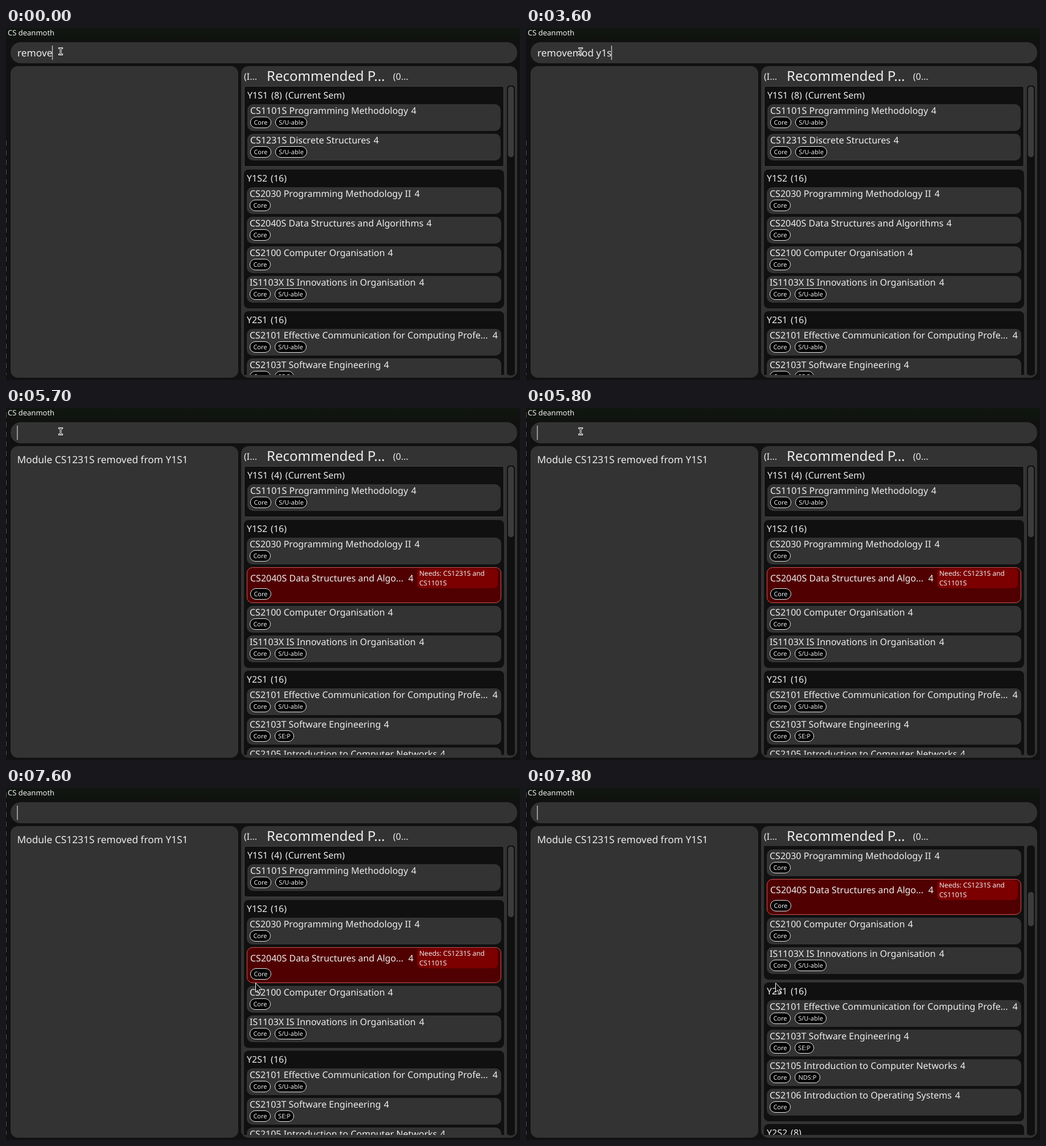
Write an HTML page that moves like this. It is 903 px wide and 619 px high and loops after 8 s.

```html
<!DOCTYPE html>
<html lang="en">
<head>
<meta charset="utf-8">
<title>Module planner</title>
<style>
html, body { margin: 0; width: 100%; height: 100%; overflow: hidden; background: #101110; }
svg { display: block; width: 100%; height: 100%; }
text { font-family: "Noto Sans", sans-serif; font-size: 16px; fill: #eee; white-space: pre; text-rendering: geometricPrecision; }
.input { font-size: 17.33px; }
.heading { font-size: 24px; }
.small { font-size: 13px; }
.tag { font-size: 11px; text-anchor: middle; }
.needs { font-size: 12px; }
.end { text-anchor: end; }
</style>
</head>
<body>
<svg viewBox="0 0 903 619">
  <defs>
    <linearGradient id="titleBar" x1="0" y1="0" x2="0" y2="1">
      <stop offset="0" stop-color="#10170f"/><stop offset="1" stop-color="#101110"/>
    </linearGradient>
    <clipPath id="viewport"><rect x="413" y="102" width="465" height="508"/></clipPath>
    <path id="beam" d="M-2.5-5.5H-1.5L0-4.5 1.5-5.5H2.5M0-4.5V4.5M-2.5 5.5H-1.5L0 4.5 1.5 5.5H2.5"/>
  </defs>
  <rect width="903" height="619" fill="#101110"/>
  <rect width="903" height="25" fill="url(#titleBar)"/>
  <path id="edge" stroke="#555" stroke-dasharray="9 8"/>
  <text class="small" x="3" y="12.5">CS deanmoth</text>
  <g fill="#333">
    <rect x="8" y="25" width="890" height="37" rx="18"/>
    <rect x="8" y="67" width="400" height="548" rx="13"/>
    <rect x="413" y="67" width="485" height="548" rx="13"/>
  </g>
  <text class="input" id="command" x="20" y="50"></text>
  <path id="caret" stroke="#ccc" stroke-width="1.3"/>
  <text class="input" id="message" x="19.5" y="97">Module CS1231S removed from Y1S1</text>
  <text x="418" y="91">(I...</text>
  <text class="heading" x="458" y="93">Recommended P...</text>
  <text x="680" y="91">(0...</text>
  <g clip-path="url(#viewport)"><g id="before"></g><g id="after"></g></g>
  <rect x="880" y="101" width="14" height="510" rx="5" fill="#101010"/>
  <rect id="thumb" x="882" width="10" rx="4.5" fill="#3c3c3c"/>
  <g id="ibeam" fill="none" stroke-linecap="square">
    <use href="#beam" stroke="#fff" stroke-width="3"/>
    <use href="#beam" stroke="#111"/>
  </g>
  <path id="arrow" d="M.5.8V17L4.2 13.5 6.7 19.3 9.3 18.2 6.8 12.5H11.6Z" fill="#111" stroke="#fff"/>
</svg>
<script>
const $ = id => document.getElementById(id);
const rect = (x, y, w, h, r, fill, stroke) =>
  `<rect x="${x}" y="${y}" width="${w}" height="${h}" rx="${r}" fill="${fill}" ${stroke ? `stroke="${stroke}"` : ""}/>`;
const text = (x, y, value, cls = "") => `<text x="${x}" y="${y}" class="${cls}">${value}</text>`;

const pillWidth = { "Core": 37, "S/U-able": 56, "SE:P": 34, "NDS:P": 45 };
function pills(x, middle, tags) {
  return tags.map(tag => {
    const w = pillWidth[tag];
    const pill = rect(x + .5, middle - 9.5, w - 1, 19, 9.5, "#000", "#e8e8e8") +
      text(x + w / 2, middle + 4, tag, "tag");
    x += w + 7;
    return pill;
  }).join("");
}

// A module is [title, right edge of its credits, extra tag, blocked]
const methodology = ["CS1101S Programming Methodology", 721, "S/U-able"];
const discrete = ["CS1231S Discrete Structures", 655, "S/U-able"];
const secondSem = algorithms => [
  ["CS2030 Programming Methodology II", 727],
  algorithms,
  ["CS2100 Computer Organisation", 680],
  ["IS1103X IS Innovations in Organisation", 735, "S/U-able"]
];
const thirdSem = [
  ["CS2101 Effective Communication for Computing Profe...", 864, "S/U-able"],
  ["CS2103T Software Engineering", 673, "SE:P"],
  ["CS2105 Introduction to Computer Networks", 772, "NDS:P"],
  ["CS2106 Introduction to Operating Systems", 763]
];

function card([title, creditsEnd, extra, blocked], inset, y) {
  const x = 423 + inset, w = 447 - 2 * inset, h = blocked ? 63 : 47;
  const left = x + (blocked ? 6 : 5), base = y + (blocked ? 25 : 17);
  return (blocked
    ? rect(x + .5, y + .5, w - 1, h - 1, 9.5, "#500000", "#d95050") +
      rect(722, y + 2, 142, 35, 8, "#7c0000") +
      text(726, y + 15, "Needs: CS1231S and", "needs") + text(726, y + 32, "CS1101S", "needs")
    : rect(x, y, w, h, 10, "#333")) +
    text(left, base, title) + text(creditsEnd, base, "4", "end") +
    pills(left, y + (blocked ? 47 : 32), extra ? ["Core", extra] : ["Core"]);
}

function semesterList(semesters) {
  let top = 102;
  return semesters.map(([name, modules], i) => {
    const inset = i ? 0 : 1;   // the current semester has a border
    let y = top + 31 + inset, cards = "";
    for (const module of modules) {
      cards += card(module, inset, y);
      y += module[3] ? 68 : 52;
    }
    const h = y + 5 + inset - top;
    const box = inset ? rect(418.5, top + .5, 456, h - 1, 3, "#101010", "#464646")
                      : rect(418, top, 457, h, 8, "#101010");
    const spacedName = name.replaceAll(" (", ' <tspan dx="1.8">(</tspan>');
    const title = text(423 + inset, top + 21 + inset, spacedName);
    top += h + 5;
    return box + title + cards;
  }).join("");
}

$("before").innerHTML = semesterList([
  ["Y1S1 (8) (Current Sem)", [methodology, discrete]],
  ["Y1S2 (16)", secondSem(["CS2040S Data Structures and Algorithms", 748])],
  ["Y2S1 (16)", thirdSem]
]);
$("after").innerHTML = semesterList([
  ["Y1S1 (4) (Current Sem)", [methodology]],
  ["Y1S2 (16)", secondSem(["CS2040S Data Structures and Algo...", 716, "", true])],
  ["Y2S1 (16)", thirdSem],
  ["Y2S2 (8)", []]
]);

const LOOP = 8000, SUBMIT = 5600;
const typed = "removemod y1s1 cs1231s";
const keyTimes = [1600, 1700, 1900, 2900, 3300, 3600, 3800, 3900, 4100, 4200, 4500, 4600, 4700, 4900, 5300];
const caretToggles = [400, 1000, 1400, 1600, 2400, 2900, 6100, 6600, 7100, 7600];
const passed = (times, t) => times.filter(time => time <= t).length;
const show = (id, on) => $(id).setAttribute("visibility", on ? "visible" : "hidden");
const move = (id, x, y) => $(id).setAttribute("transform", `translate(${x} ${y})`);

function draw(t) {
  const submitted = t >= SUBMIT;
  const keys = passed(keyTimes, t);
  const value = submitted ? "" : typed.slice(0, keys ? 7 + keys : 6);
  $("command").textContent = value;
  const caretX = 20 + (value ? $("command").getComputedTextLength() : 0);
  $("caret").setAttribute("d", `M${caretX} 31V56`);
  show("caret", passed(caretToggles, t) % 2 === 0);

  show("message", submitted);
  show("before", !submitted);
  show("after", submitted);
  $("edge").setAttribute("d", submitted ? "M.5 8V610" : "M.5 198V610");

  const step = t < 7700 ? 0 : t < 7800 ? 1 : 2;
  move("after", 0, [0, -80, -120][step]);
  $("thumb").setAttribute("y", [103, 162, 183][step]);
  $("thumb").setAttribute("height", [124, 124, 60][step]);

  // The pointer is sampled ten times a second
  const p = Math.min(1, Math.max(0, (Math.floor(t / 100) - 68) / 4));
  const ease = p * p * (3 - 2 * p);
  show("ibeam", p === 0);
  show("arrow", p > 0);
  move("ibeam", 96, 41);
  move("arrow", 96 + 342 * ease, 41 + 301 * ease);
}

const start = performance.now();
function tick() {
  draw((performance.now() - start) % LOOP);
  requestAnimationFrame(tick);
}
tick();
</script>
</body>
</html>
```
